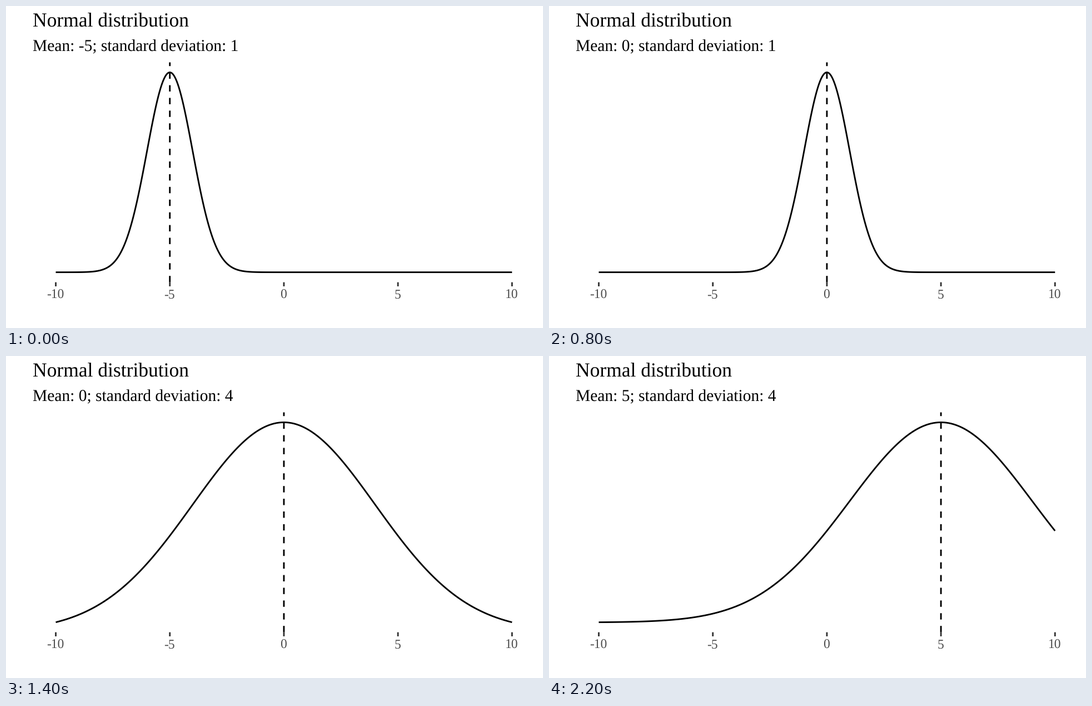
These frames come from a looping animation (966x580 px, 2400 ms). A matplotlib script:

```python
import itertools

import matplotlib.pyplot as plt
import numpy as np
from matplotlib.animation import FuncAnimation

W, H, DPI = 966, 580, 64
PT = 72 / DPI  # points per pixel

plt.rcParams.update({
    "font.family": "Liberation Serif",
    "text.hinting": "none",
    "axes.unicode_minus": False,
    "path.simplify": False,
})

LEFT, RIGHT, TOP, BOTTOM = 48.5, 951.3, 101.5, 497.6  # panel edges
LINE = 2.863
STATES = list(itertools.product((-5, 0, 5), (1, 2, 3, 4)))  # mean, sd

fig = plt.figure(figsize=(W / DPI, H / DPI), dpi=DPI, facecolor="white")
ax = fig.add_axes([0, 0, 1, 1])
ax.set_xlim(0, W)
ax.set_ylim(H, 0)
ax.axis("off")


def px(x):
    return LEFT + (x + 11) / 22 * (RIGHT - LEFT)


def py(y):
    return BOTTOM - (y + 0.05) / 1.1 * (BOTTOM - TOP)


def label(x, y, text, size, color="black", ha="left"):
    return ax.text(x, y, text, fontsize=size * PT, color=color,
                   ha=ha, va="baseline")


def stroke(x, y, color="black", **kw):
    return ax.plot(x, y, color=color, lw=LINE * PT, snap=False,
                   solid_capstyle="butt", dash_capstyle="butt",
                   solid_joinstyle="round", **kw)[0]


label(LEFT, 38, "Normal distribution", 35.5)
subtitle = label(LEFT, 81, "", 29.5)

for v in range(-10, 11, 5):
    stroke([px(v)] * 2, [BOTTOM, BOTTOM + 7.35], "#333333")
    label(px(v) - 0.7, 527, str(v), 23.5, "#4d4d4d", "center")

grid = np.linspace(-10, 10, 401)
curve = stroke(px(grid), np.full_like(grid, py(0)))
center = stroke([px(0)] * 2, [BOTTOM, TOP], ls=(0, (4, 4)))


def update(i):
    mean, sd = STATES[i]
    d = np.exp(-((grid - mean) / sd) ** 2 / 2)
    # every curve fills the full height of the panel
    curve.set_ydata(py((d - d.min()) / (d.max() - d.min())))
    center.set_xdata([px(mean)] * 2)
    subtitle.set_text(f"Mean: {mean}; standard deviation: {sd}")
    return curve, center, subtitle


anim = FuncAnimation(fig, update, frames=len(STATES), interval=200,
                     repeat=True, repeat_delay=0, blit=False)
plt.show()
```
